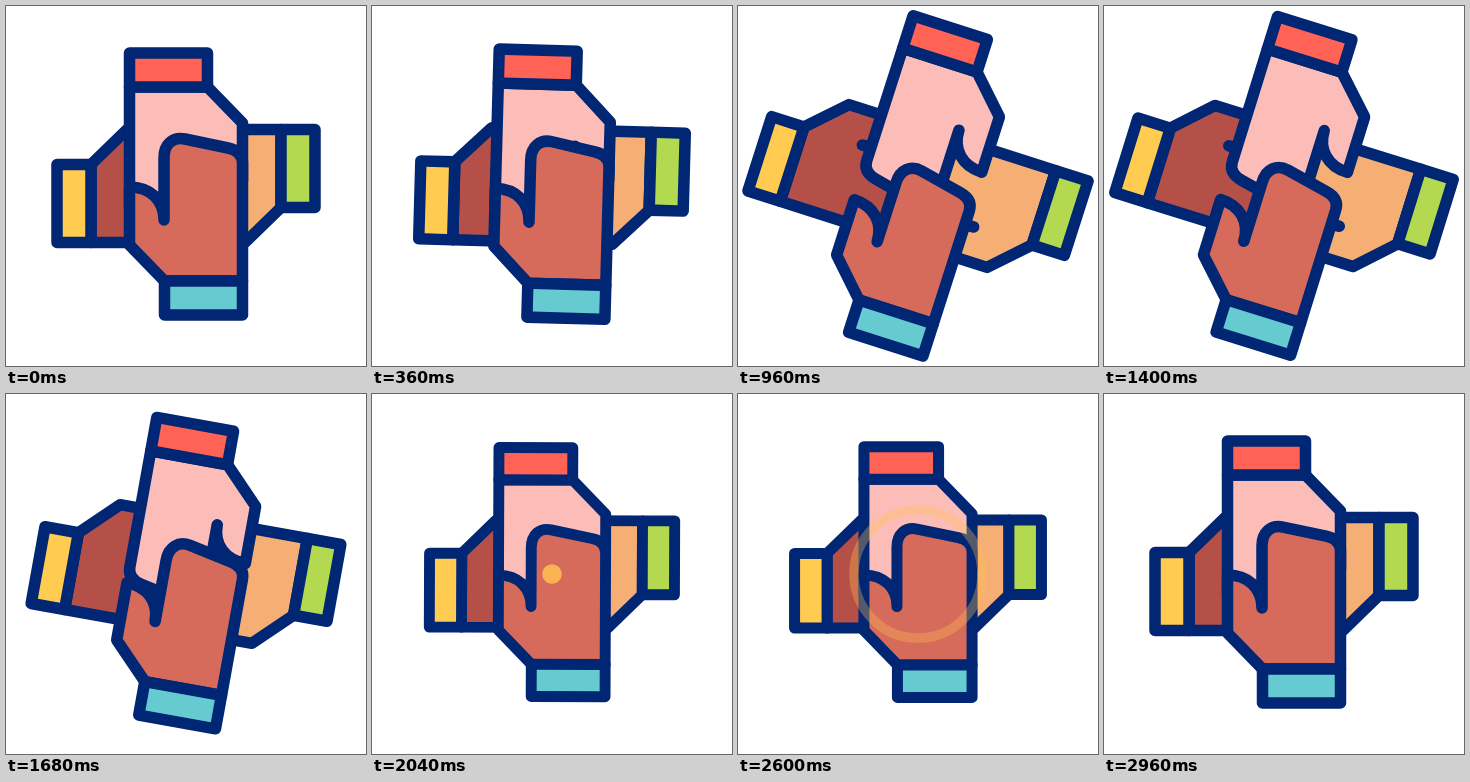
Animation of 360x360 px, one loop 3 s. Source, as an HTML page:

```html
<!DOCTYPE html>
<html lang="en">
<head>
<meta charset="utf-8">
<title>Hands together</title>
<style>
  html, body { margin: 0; width: 100%; height: 100%; overflow: hidden; background: #fff; }
  svg { display: block; width: 100vw; height: 100vh; }
  .hand { stroke: #002674; stroke-width: 11.5; stroke-linecap: round; stroke-linejoin: round; }
</style>
</head>
<body>
<svg viewBox="-180 -180 360 360">
  <g id="hands"></g>
  <circle id="ring" fill="none" stroke="#ffbe50" stroke-width="9.5"/>
</svg>
<script>
const LOOP = 3000, STEP = 40;
const PALM = 'M-21.5 95L-56.5 59V1C-36 1-22 14-22 34V-28C-22-42-13-49.5-1-47L42-38C52-36 56.5-31 56.5-23V95Z';
const CUFF = 'M-21.5 95H56.5V129H-21.5Z';

// Listed from back to front; rest is the slide while the hands are together.
const hands = [
  { turn: 90, skin: '#b45047', cuff: '#ffcb50', rest: 0 },
  { turn: 270, skin: '#f5ae73', cuff: '#b2d94f', rest: 0 },
  { turn: 180, skin: '#fcbdb9', cuff: '#ff6356', rest: 4 },
  { turn: 0, skin: '#d66b5c', cuff: '#66cbd0', rest: 0 }
];
const OPEN_SLIDE = 32, OPEN_ANGLE = 18, SQUEEZE = 0.053;

const group = document.getElementById('hands');
const ring = document.getElementById('ring');

function add(parent, tag, attributes) {
  const node = document.createElementNS('http://www.w3.org/2000/svg', tag);
  for (const key in attributes) node.setAttribute(key, attributes[key]);
  return parent.appendChild(node);
}

for (const hand of hands) {
  hand.node = add(group, 'g', { class: 'hand' });
  add(hand.node, 'path', { d: PALM, fill: hand.skin });
  add(hand.node, 'path', { d: CUFF, fill: hand.cuff });
}

const progress = (time, start, end) =>
  Math.min(1, Math.max(0, (time - start) / (end - start)));

// Cubic easing with horizontal handles at x1 and x2.
function ease(x, x1, x2) {
  let low = 0, high = 1;
  for (let i = 0; i < 24; i++) {
    const u = (low + high) / 2, v = 1 - u;
    if (3 * v * v * u * x1 + 3 * v * u * u * x2 + u * u * u < x) low = u;
    else high = u;
  }
  return low * low * (3 - 2 * low);
}

function draw(time) {
  const open = ease(progress(time, 36, 1116), 0.75, 0.25)
             - ease(progress(time, 1160, 2160), 0.8, 0.3);
  const squeeze = ease(progress(time, 1760, 2040), 0.4, 0.6)
                - ease(progress(time, 2360, 3000), 0.7, 0.3);
  group.setAttribute('transform',
    `rotate(${open * OPEN_ANGLE}) scale(${1 - SQUEEZE * squeeze})`);
  for (const { node, turn, rest } of hands) {
    const slide = rest + (OPEN_SLIDE - rest) * open;
    node.setAttribute('transform', `rotate(${turn}) translate(0 ${slide})`);
  }

  const ripple = progress(time, 2000, 2960);
  ring.setAttribute('r', 77 * Math.sin(ripple * Math.PI / 2));
  ring.setAttribute('opacity', ripple > 0 ? 0.9 * (1 - ripple) : 0);
}

const begin = performance.now();
function tick() {
  const time = (performance.now() - begin) % LOOP;
  draw(Math.floor(time / STEP) * STEP);
  requestAnimationFrame(tick);
}
tick();
</script>
</body>
</html>
```
